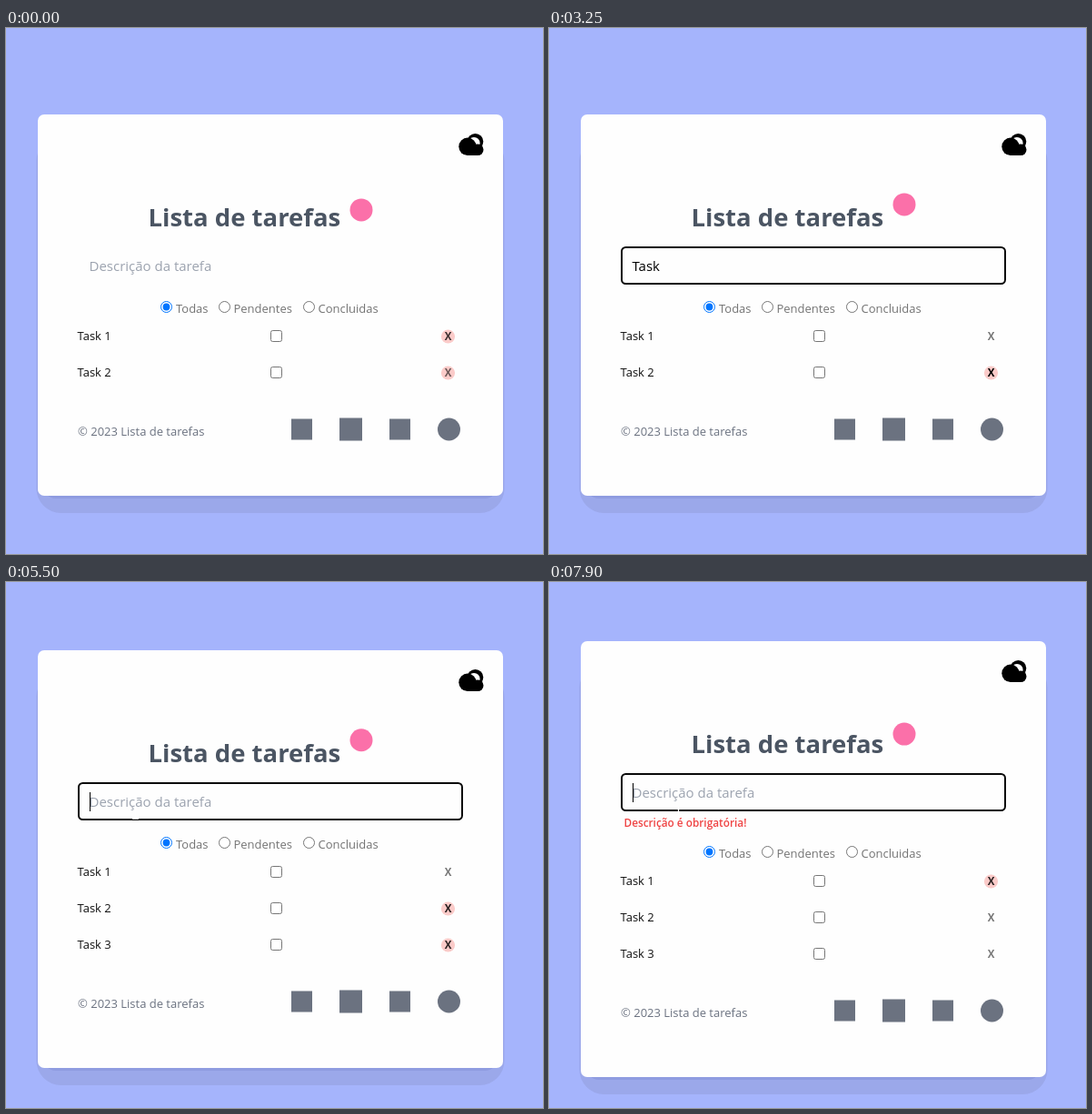
These frames come from a looping animation (591 px wide and 578 px high, 8 s). An HTML page:

```html
<!DOCTYPE html>
<html lang="pt">
<head>
<meta charset="utf-8">
<title>Lista de tarefas</title>
<style>
  html, body { margin: 0; width: 100%; height: 100%; overflow: hidden; background: #a5b4fc; }
  svg { display: block; width: 591px; height: 578px; }
  text { font: 13px "Open Sans", "Noto Sans", sans-serif; white-space: pre; }
  .title { font-size: 27.5px; font-weight: 700; fill: #4b5563; }
  .field { font-size: 15px; }
  .label { fill: #737373; }
  .error { font-size: 11.8px; font-weight: 600; fill: #ef4444; }
  .remove { font-size: 11.5px; font-weight: 700; text-anchor: middle; }
  .control { fill: #fff; stroke: #767676; }
</style>
</head>
<body>
<svg viewBox="0 0 591 578">
  <rect width="591" height="578" fill="#a5b4fc"/>
  <rect id="shadow" x="33.5" width="515" rx="27" fill="#9ba8ea"/>
  <rect id="edge" x="41" width="500" rx="14" fill="#8f9ce0"/>
  <rect id="card" x="35" width="512" rx="7" fill="#fefefe"/>

  <g id="header">
    <g id="cloud">
      <circle cx="516.5" cy="29.8" r="8.8"/>
      <circle cx="515" cy="31.5" r="6.6" fill="#fff"/>
      <circle cx="508" cy="35.3" r="9.7"/>
      <circle cx="519.2" cy="38.7" r="6.3"/>
      <path d="M507 35h12v10h-12z"/>
    </g>
    <text class="title" x="156.5" y="123">Lista de tarefas</text>
    <circle id="mascot" cx="391" r="12.5" fill="#fb70a9"/>
    <rect id="focus" x="80" y="146" width="422" height="40" rx="4.5" fill="none" stroke="#0a0a0a" stroke-width="2"/>
  </g>
  <path id="pointer" d="M142.5 247v13M139 260h7" fill="none" stroke="#fff" stroke-width="1.4"/>
  <g id="entry">
    <text id="field" class="field" x="91.5" y="172"></text>
    <path id="caret" d="M.5 156v21" stroke="#000"/>
    <text id="error" class="error" x="82.5" y="204">Descrição é obrigatória!</text>
  </g>

  <g id="body">
    <g class="control">
      <circle cx="176.5" cy="211.5" r="6" stroke="#0075ff"/>
      <circle cx="240.5" cy="211.5" r="6"/>
      <circle cx="333.5" cy="211.5" r="6"/>
    </g>
    <circle cx="176.5" cy="211.5" r="3.9" fill="#0075ff"/>
    <g class="label">
      <text x="187" y="218">Todas</text>
      <text x="250.5" y="218">Pendentes</text>
      <text x="343.5" y="218">Concluidas</text>
    </g>
    <g id="tasks"></g>
  </g>

  <g id="footer" fill="#6b7280">
    <text x="79" y="7">© 2023 Lista de tarefas</text>
    <rect x="314" y="-11.5" width="23" height="23"/>
    <rect x="367" y="-12.5" width="25" height="25"/>
    <rect x="422" y="-11.5" width="23" height="23"/>
    <circle cx="487.5" cy="0" r="12.5"/>
  </g>
</svg>
<script>
  const LOOP = 8000, BOUNCE = 977, PULSE = 1954, BLINK = 530;
  const FOCUS = 700, SUBMIT = 4350, CLEAR = 4850, ADDED = 5100, INVALID = 7300;
  const typing = [[1650, 'T'], [1900, 'Ta'], [2100, 'Tas'], [2300, 'Task'], [2700, 'Task '], [3500, 'Task 3']];
  const pulsePeaks = [470, 1227, 1192];

  const $ = id => document.getElementById(id);
  const set = (el, attrs) => { for (const k in attrs) el.setAttribute(k, attrs[k]); };
  const show = (el, on) => set(el, { visibility: on ? 'visible' : 'hidden' });
  const moveY = (id, y) => set($(id), { transform: `translate(0 ${y})` });

  $('tasks').innerHTML = pulsePeaks.map((_, i) => `
    <g class="task" transform="translate(0 ${40 * i})">
      <text x="78.5" y="248" fill="#111">Task ${i + 1}</text>
      <rect class="control" x="291.5" y="237.5" width="12" height="12" rx="2"/>
      <circle class="halo" cx="486.5" cy="244" r="7.6" fill="#fbcbc9"/>
      <text class="remove" x="486.5" y="248.2">X</text>
    </g>`).join('');
  const tasks = [...document.querySelectorAll('.task')].map(el => ({
    el, halo: el.querySelector('.halo'), cross: el.querySelector('.remove')
  }));

  // Height of cubic-bezier(0, 0, .2, 1) at progress x.
  function easeOut(x) {
    let lo = 0, hi = 1;
    for (let i = 0; i < 20; i++) {
      const s = (lo + hi) / 2;
      if (.6 * (1 - s) * s * s + s ** 3 < x) lo = s; else hi = s;
    }
    return lo * lo * (3 - 2 * lo);
  }

  function drawCard(t) {
    const added = t >= ADDED, invalid = t >= INVALID;
    const top = invalid ? 65 : added ? 75 : 95;
    const bottom = 609 - top;
    set($('shadow'), { y: top + 24, height: bottom - top - 5 });
    set($('edge'), { y: top + 30, height: bottom - top - 27 });
    set($('card'), { y: top, height: bottom - top });
    moveY('header', top);
    moveY('entry', top);
    moveY('body', top + (invalid ? 20 : 0));
    moveY('footer', bottom - 73);
    show($('error'), invalid);
    show($('pointer'), added);
    const phase = t % BOUNCE / BOUNCE;
    set($('mascot'), { cy: 105 - 6.5 * easeOut(1 - Math.abs(1 - 2 * phase)) });
  }

  function drawEntry(t) {
    const key = typing.filter(([at]) => at <= t).pop();
    const text = key && t < CLEAR ? key[1] : '';
    const field = $('field');
    field.textContent = text || 'Descrição da tarefa';
    set(field, { fill: text ? '#000' : '#9ca3af' });
    const blinkStart = t >= SUBMIT ? SUBMIT : key ? key[0] : FOCUS;
    const caretX = 92 + (text ? Math.round(field.getComputedTextLength() - .5) : 0);
    set($('caret'), { transform: `translate(${caretX} 0)` });
    show($('caret'), t >= FOCUS && (t - blinkStart) % (2 * BLINK) < BLINK);
    show($('focus'), t >= FOCUS);
  }

  function drawTasks(t) {
    tasks.forEach(({ el, halo, cross }, i) => {
      const visible = i < 2 || t >= ADDED;
      const alpha = .75 + .25 * Math.cos(2 * Math.PI * (t - pulsePeaks[i]) / PULSE);
      set(el, { display: visible ? 'inline' : 'none' });
      show(halo, alpha > .555);
      set(cross, { 'fill-opacity': alpha });
    });
  }

  const start = performance.now();
  function frame() {
    const t = (performance.now() - start) % LOOP;
    drawCard(t);
    drawEntry(t);
    drawTasks(t);
    requestAnimationFrame(frame);
  }
  frame();
</script>
</body>
</html>
```
